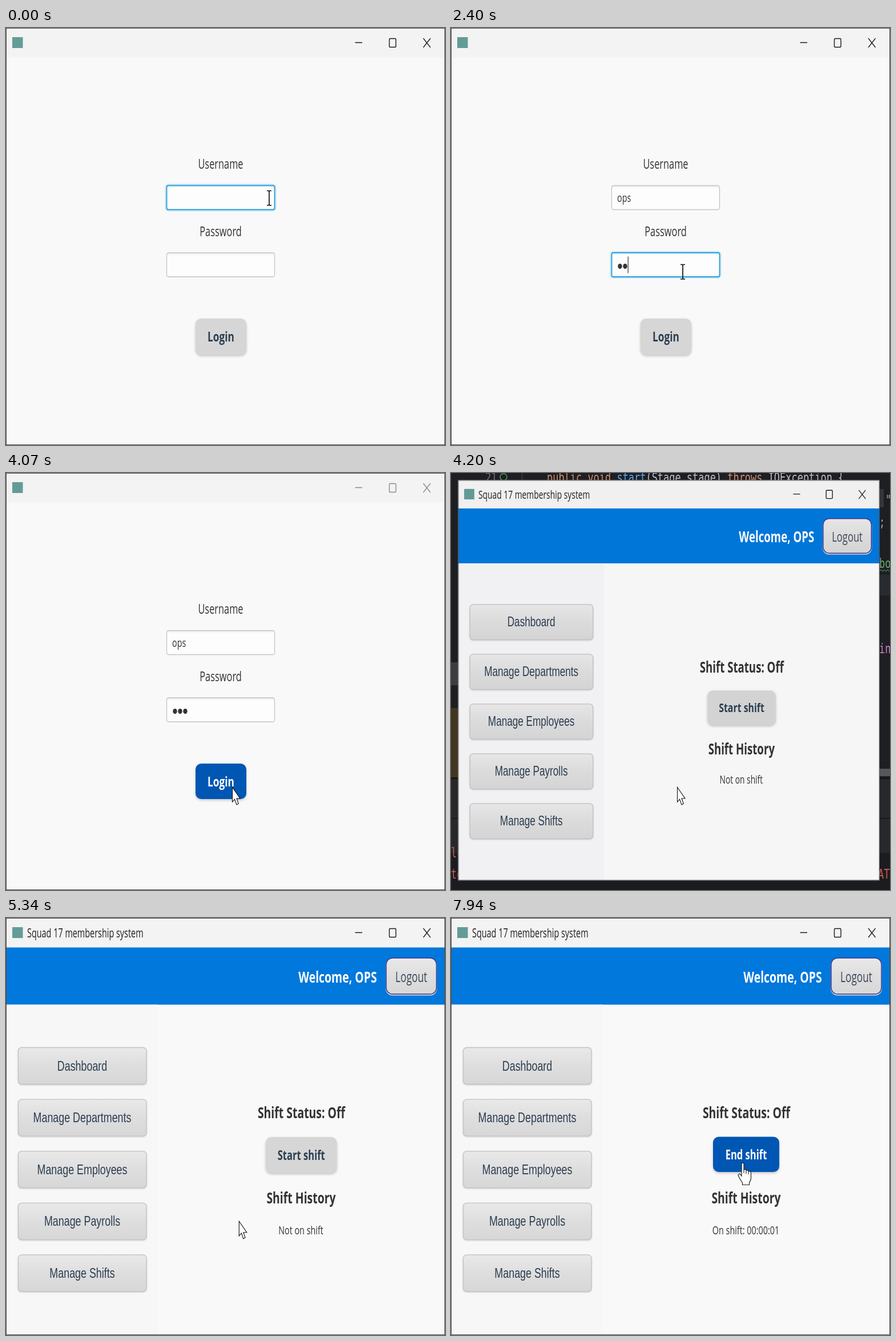
These frames come from a looping animation (769x729 px, 8 s). An HTML page:

```html
<!DOCTYPE html>
<html lang="en">
<head>
<meta charset="utf-8">
<title>Login and shift window</title>
<style>
html, body { margin: 0; width: 100%; height: 100%; overflow: hidden; background: #1e1f22; }
svg { display: block; }
text { font-family: "Open Sans", "Noto Sans", sans-serif; white-space: pre; }
.bold { font-weight: 700; }
.arial { font-family: "Liberation Sans", Arial, sans-serif; }
.mono { font-family: "DejaVu Sans Mono", monospace; }
.raised { filter: drop-shadow(0 2px 2px rgba(0, 0, 0, .22)); }
.soft { filter: drop-shadow(0 1px 1px rgba(0, 0, 0, .18)); }
</style>
</head>
<body>
<svg width="769" height="729" viewBox="0 0 769 729">
  <defs>
    <linearGradient id="grey" x2="0" y2="1">
      <stop stop-color="#e9e9e9"/><stop offset=".5" stop-color="#dedede"/><stop offset="1" stop-color="#d7d7d7"/>
    </linearGradient>
    <linearGradient id="inset" x2="0" y2="1">
      <stop stop-color="#ececec"/><stop offset=".12" stop-color="#fdfdfd"/>
    </linearGradient>
  </defs>
  <g id="stage"></g>
</svg>
<script>
const LOOP = 8000, FPS = 15;
const USER = 'ops';
const TITLE = 'Squad 17 membership system';
const INK = '#333', NAVY = '#2c3e50', BLUE = '#0056b3';

// The screen is narrowed sideways; one ratio per typeface.
const SQUEEZE = { '': .69, bold: .72, arial: .745, mono: .75 };

const TYPED = [140, 340, 600];
const DOTS = [2140, 2400, 2670];

// Pointer path: time, x, y
const PATH = [
  [0, 461, 297], [1130, 461, 297], [1330, 454, 330], [1600, 442, 400], [1800, 430, 440],
  [1870, 425, 441], [1940, 406, 426], [3480, 406, 426], [3740, 399, 535], [3870, 396, 549],
  [5190, 396, 549], [5200, 392, 547], [5290, 392, 547], [5600, 490, 440], [5800, 548, 444],
  [5870, 548, 444], [5940, 531, 438], [6000, 511, 422], [7930, 511, 422], [7940, 511, 428], [8000, 511, 428]
];

// Dashboard opening: time, offset, scale
const OPENING = [[4200, 12.5, .96], [4270, 4.5, .986], [4340, 1, .9965], [4400, 0, 1]];

const rect = (x, y, w, h, fill, more = '') =>
  `<rect x="${x}" y="${y}" width="${w}" height="${h}" fill="${fill}" ${more}/>`;

const line = (d, colour, width = 1.4) =>
  `<path d="${d}" fill="none" stroke="${colour}" stroke-width="${width}"/>`;

function label(x, y, size, words, fill = INK, face = '', anchor = 'middle') {
  return `<text class="${face}" transform="translate(${x} ${y}) scale(${SQUEEZE[face]} 1)" ` +
    `font-size="${size}" text-anchor="${anchor}" fill="${fill}">${words}</text>`;
}

const count = (times, t) => times.filter(at => t >= at).length;
const inside = (p, x, y, w, h) => p.x >= x && p.x <= x + w && p.y >= y && p.y <= y + h;

function pointerAt(t) {
  const i = Math.max(1, PATH.findIndex(k => k[0] >= t));
  const [a, b] = [PATH[i - 1], PATH[i]];
  const f = (t - a[0]) / (b[0] - a[0]);
  return { x: a[1] + (b[1] - a[1]) * f, y: a[2] + (b[2] - a[2]) * f };
}

function pointer({ x, y }, kind) {
  const shape = {
    beam: line('M-4 -12.5H-1L0 -11.5L1 -12.5H4M-4 13H-1L0 12L1 13H4M0 -12V12.5', '#111', 1.7),
    arrow: '<path d="M.5 .5V26L4.6 21.3L8 31L11.3 29L8 20H14Z" fill="#fff" stroke="#111" stroke-width="1.1"/>',
    hand: '<path d="M-2 18V2.5Q-2 0 0 0T2 2.5V12Q5.500 10.500 6 13.500Q9.500 12 10 15Q14 14 14.500 18V26Q14.500 31 11.500 34V38.500H-.5V35' +
      'Q-4 30 -7 24Q-9 20 -6.500 19.500Q-4.500 19 -2 23Z" fill="#fff" stroke="#222" stroke-width="1.2"/>' +
      line('M2 12V18M6 14V19M10 15.500V20', '#222', 1.1)
  };
  return `<g transform="translate(${x.toFixed(1)} ${y.toFixed(1)})">${shape[kind]}</g>`;
}

function frame(title, ink) {
  return rect(0, 0, 769, 729, '#f9f9f9') + rect(0, 0, 769, 51.5, '#f3f3f3') +
    rect(11, 16, 18.500, 19, '#649b98') +
    label(37, 34, 20.9, title, '#222', '', 'start') +
    line('M611.500 25.500H624M731 18L743.500 34M743.500 18L731 34', ink, 1.3) +
    rect(671.5, 18.5, 11.5, 15, 'none', `rx="1.5" stroke="${ink}" stroke-width="1.4"`);
}

const border = rect(.5, .5, 768, 728, 'none', 'stroke="#4a4a4a"');

function field(y, focused) {
  return focused
    ? rect(280, y - 1, 192, 45, 'none', 'rx="5" stroke="#c3e4f5" stroke-width="3"') +
      rect(281.5, y + .5, 189, 42, '#fdfdfd', 'rx="3" stroke="#2b9fd8" stroke-width="1.8"')
    : rect(281.5, y + .5, 189, 42, 'url(#inset)', 'rx="3.5" stroke="#c4c4c4" stroke-width="1.3"');
}

function pushButton(x, y, w, h, words, size, hot, fill = BLUE) {
  return rect(x, y, w, h, hot ? fill : '#d6d6d6', 'rx="10" class="raised"') +
    label(x + w / 2, y + 39.5, size, words, hot ? '#fff' : NAVY, 'bold');
}

function login(t, p) {
  const onName = t < 2000, onPass = !onName && t < 3860;
  const letters = count(TYPED, t), dots = count(DOTS, t);
  const hot = inside(p, 332, 508, 89, 63);
  const lit = t >= 140 && !(t >= 1066 && t < 1566) && !(t >= 3130 && t < 3630);
  const caret = (x, y) => lit ? line(`M${x} ${y}v29`, '#333', 1.2) : '';
  let out = frame('', t >= 4060 ? '#8a8a8a' : '#1a1a1a') +
    label(376, 246, 23.7, 'Username') + field(275, onName) +
    label(376, 364, 23.7, 'Password') + field(392.5, onPass) +
    label(291, 304, 20.8, USER.slice(0, letters), INK, '', 'start');
  for (let i = 0; i < dots; i++)
    out += `<ellipse cx="${296 + 9 * i}" cy="416.500" rx="3.700" ry="4.600" fill="#333"/>`;
  if (onName) out += caret(291.5 + 8.3 * letters, 282);
  if (onPass) out += caret(292 + 9.1 * dots, 399.5);
  return out + pushButton(332, 508, 89, hot ? 62 : 63.5, 'Login', 24, hot) + border;
}

function dashboard(t, p) {
  const ended = t >= 6740;
  const hot = inside(p, 455, 383, 125, 63);
  let out = frame(TITLE, '#1a1a1a') +
    rect(0, 51.5, 769, 100, '#0078dc') + rect(0, 151.5, 266, 577, t < 4400 ? '#f4f4f7' : '#f7f7f8') +
    label(581, 113, 27, 'Welcome, ' + USER.toUpperCase(), '#fff', 'bold') +
    rect(665, 70, 90, 65.5, '#d5d5dc', 'rx="12"') +
    rect(666, 70, 88, 63, 'url(#grey)', 'rx="11" stroke="#3b358f" stroke-width="1.500"') +
    label(710, 111.5, 25, 'Logout', '#3a4858');
  ['Dashboard', 'Manage Departments', 'Manage Employees', 'Manage Payrolls', 'Manage Shifts'].forEach((words, i) => {
    const y = 226.5 + 90.6 * i;
    out += rect(21.5, y, 224.5, 64, 'url(#grey)', 'rx="6" stroke="#c3c3c3" stroke-width="1.300" class="soft"') +
      label(133.5, y + 40, 24, words, NAVY, 'arial');
  });
  out += label(517.5, 350, 27, 'Shift Status: Off', INK, 'bold') +
    (ended ? pushButton(459, 382.5, 116, 61.5, 'End shift', 23, hot)
      : pushButton(455, 383, 124.5, hot ? 62 : 63, 'Start shift', 23, hot, t >= 6600 ? '#004a9c' : BLUE)) +
    label(517, 499, 27, 'Shift History', INK, 'bold') +
    label(516.5, 553, 20.8, t >= 7730 ? 'On shift: 00:00:01' : 'Not on shift');
  return out + border;
}

// Code editor glimpsed around the window while it grows
function editor() {
  const code = (x, y, words, fill) => label(x, y, 22.6, words, fill, 'mono', 'start');
  const span = (words, fill) => `<tspan fill="${fill}">${words}</tspan>`;
  return rect(0, 0, 769, 729, '#1e1f22') + rect(0, 331, 14, 40, '#3b3d41') + rect(0, 411, 14, 121, '#41361f') +
    rect(0, 535, 769, 177, '#26282b') + rect(0, 533, 769, 2, '#111') + rect(0, 603, 769, 1.5, '#141517') +
    rect(750, 28, 8, 32, '#34363a') + rect(750, 178, 19, 36, '#292b31') + rect(750, 517, 19, 13, '#55575b') +
    rect(0, 664, 769, 65, '#1b1c1f') + rect(124, 0, 1, 14, '#44464a') +
    `<circle cx="92" cy="7" r="6" fill="none" stroke="#57965c" stroke-width="1.500"/>` +
    code(60, 16, '21', '#6b6e75') +
    code(168, 16, span('public void ', '#cf8e6d') + span('start', '#56a8f5') + '(Stage stage) ' +
      span('throws ', '#cf8e6d') + 'IOException {', '#bcbec4') +
    code(761, 55, '"', '#a0a3a8') + code(750, 94, ';', '#a0a3a8') + code(750, 166, 'bo', '#6aab73') +
    line('M750 172l3 -3l3 3l3 -3l3 3l3 -3l3 3', '#6aab73', 1) + code(750, 315, 'in', '#c77dbb') +
    code(0, 672, 'lc', '#d05b50') + code(0, 709, 'to', '#d05b50') + code(748, 709, 'ATE', '#d05b50');
}

function scene(t) {
  const p = pointerAt(t);
  const first = t < 4190;
  let kind = 'arrow', view;
  if (first) {
    if (inside(p, 281, 275, 190, 43) || inside(p, 281, 393, 190, 42)) kind = 'beam';
    else if (t < 4060 && inside(p, 332, 508, 89, 63)) kind = 'hand';
    view = login(t, p);
  } else {
    if (inside(p, 455, 383, 125, 63)) kind = 'hand';
    const [, shift, scale] = OPENING.filter(k => t >= k[0] - 10).pop();
    view = (scale < 1 ? editor() : '') +
      `<g transform="translate(${shift} ${shift}) scale(${scale})" opacity="${scale < 1 ? .99 : 1}">${dashboard(t, p)}</g>`;
  }
  return view + pointer(p, kind);
}

const stage = document.getElementById('stage');
const start = performance.now();
let shown = -1;

function draw() {
  const tick = Math.floor((performance.now() - start) % LOOP * FPS / 1000);
  if (tick !== shown) {
    shown = tick;
    // Times are rounded up to the next 10 ms.
    stage.innerHTML = scene(Math.min(LOOP, Math.ceil(tick * 100 / FPS) * 10));
  }
  requestAnimationFrame(draw);
}
draw();
</script>
</body>
</html>
```
